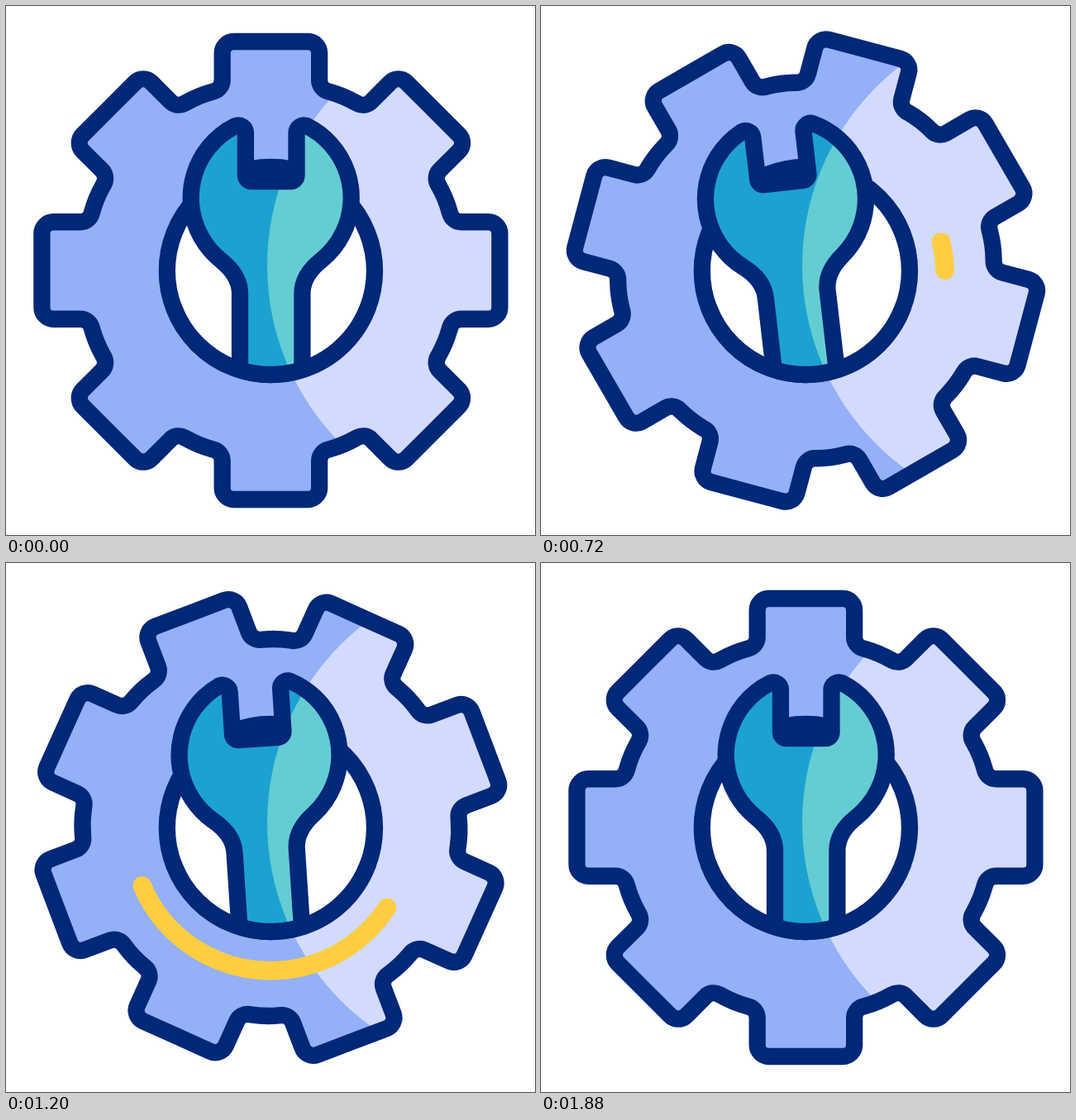
An HTML page with a canvas that plays this animation: 640 by 640 pixels, repeating every 2.44 s.

```html
<!DOCTYPE html>
<html lang="en">
<head>
<meta charset="utf-8">
<title>Gear and wrench</title>
<style>
html, body { margin: 0; width: 100%; height: 100%; overflow: hidden; background: #fff; }
canvas { display: block; width: 100vmin; height: 100vmin; }
</style>
</head>
<body>
<canvas id="stage" width="640" height="640"></canvas>
<script>
const ctx = document.getElementById('stage').getContext('2d');
const LOOP = 2440, STEP = 40, RAD = Math.PI / 180;
const NAVY = '#002878', BLUE = '#93b0f8', PALE = '#d2daff';
const TEAL = '#1ca2d0', MINT = '#64cdd3', YELLOW = '#ffcd42';
const C = 320.4, PIVOT = 448;

const clamp = v => Math.max(0, Math.min(1, v));
const smooth = u => u * u * (3 - 2 * u);
const ramp = (t, from, to) => smooth(clamp((t - from) / (to - from)));

// Cubic ease with flat ends; x1 and x2 are the handle positions.
function ease(x, x1, x2) {
  let lo = 0, hi = 1;
  for (let i = 0; i < 30; i++) {
    const s = (lo + hi) / 2, r = 1 - s;
    if (3 * x1 * s * r * r + 3 * x2 * s * s * r + s * s * s < x) lo = s; else hi = s;
  }
  return smooth(lo);
}

function gearAngle(t) {
  const back = -8.2;
  if (t < 400) return back * ramp(t, 0, 400);
  return back + (90 - back) * ease(clamp((t - 400) / 1360), 0.26, 0.435);
}

const swing = [[0, 0], [400, 3.8], [680, -7.3], [960, 5.5], [1240, -4.3], [1520, 2.2], [1860, 0]];
function wrenchAngle(t) {
  for (let i = 1; i < swing.length; i++) {
    const [t0, a] = swing[i - 1], [t1, b] = swing[i];
    if (t < t1) return a + (b - a) * ramp(t, t0, t1);
  }
  return 0;
}

function gearPath() {
  const p = new Path2D(), half = 58.75, top = -277, root = -219.7;
  const at = (x, y, deg) => {
    const c = Math.cos(deg * RAD), s = Math.sin(deg * RAD);
    return [x * c - y * s, x * s + y * c];
  };
  p.moveTo(0, top);
  for (let k = 0; k < 8; k++) {
    const a = k * 45, b = a + 45;
    const pts = [
      [at(half, top, a), 14],
      [at(half, root, a), 14],
      [at(0, -229, a + 22.5), 140],
      [at(-half, root, b), 14],
      [at(-half, top, b), 14],
      [at(0, top, b), 0]
    ];
    for (let i = 0; i < 5; i++) p.arcTo(...pts[i][0], ...pts[i + 1][0], pts[i][1]);
    p.lineTo(...pts[5][0]);
  }
  p.closePath();
  return p;
}

// Drawn around x = 0 with the real heights.
function wrenchPath() {
  const p = new Path2D(), w = 37.7, slot = 30.8, hy = 232, R = 97;
  p.moveTo(-w, 480);
  p.lineTo(-w, 348);
  p.bezierCurveTo(-w, 329, -50, 316, -61, 307.4);
  p.arc(0, hy, R, 129 * RAD, 243.5 * RAD);
  p.arcTo(-slot, 140, -slot, 180, 9);
  p.arcTo(-slot, 212, 0, 212, 7);
  p.arcTo(slot, 212, slot, 180, 7);
  p.arcTo(slot, 140, 43.3, 145.2, 9);
  p.arc(0, hy, R, -63.5 * RAD, 51 * RAD);
  p.bezierCurveTo(50, 316, w, 329, w, 348);
  p.lineTo(w, 480);
  p.closePath();
  return p;
}

const gear = gearPath(), wrench = wrenchPath();
const shine = new Path2D();
shine.arc(621, 314, 305, 0, 2 * Math.PI);
const opening = new Path2D();
opening.rect(0, 0, 640, 320);
opening.arc(C, C, 125.5, 0, Math.PI);

function place(path, m, dark, light) {
  const shape = new Path2D();
  shape.addPath(path, m);
  ctx.fillStyle = dark;
  ctx.fill(shape);
  ctx.save();
  ctx.clip(shine);
  ctx.fillStyle = light;
  ctx.fill(shape);
  ctx.restore();
  outline(shape);
}

function outline(shape, color = NAVY, width = 20.3) {
  ctx.strokeStyle = color;
  ctx.lineWidth = width;
  ctx.stroke(shape);
}

function arc(x, y, r, from, to) {
  const p = new Path2D();
  p.arc(x, y, r, from * RAD, to * RAD);
  return p;
}

function draw(t) {
  ctx.fillStyle = '#fff';
  ctx.fillRect(0, 0, 640, 640);
  ctx.lineJoin = 'round';
  ctx.lineCap = 'butt';

  place(gear, new DOMMatrix().translate(C, C - 0.4).rotate(gearAngle(t)), BLUE, PALE);

  const ring = arc(C, C, 125.6, 0, 360);
  ctx.fillStyle = '#fff';
  ctx.fill(ring);
  outline(ring);

  const head = ramp(t, 600, 1438), tail = ramp(t, 918, 1848);
  if (head - tail > 0.001) {
    ctx.lineCap = 'round';
    outline(arc(320, 324.5, 168.7, -13.4 + 212 * tail, -13.4 + 212 * head), YELLOW, 22.5);
    ctx.lineCap = 'butt';
  }

  ctx.save();
  ctx.clip(opening);
  const m = new DOMMatrix().translate(320.7, PIVOT).rotate(wrenchAngle(t)).translate(0, -PIVOT);
  place(wrench, m, TEAL, MINT);
  ctx.restore();
  outline(arc(C, C, 125.6, 20, 160));
}

let start;
function tick(now) {
  if (start === undefined) start = now;
  const t = (now - start) % LOOP;
  draw(Math.floor(t / STEP) * STEP);
  requestAnimationFrame(tick);
}
draw(0);
requestAnimationFrame(tick);
</script>
</body>
</html>
```
